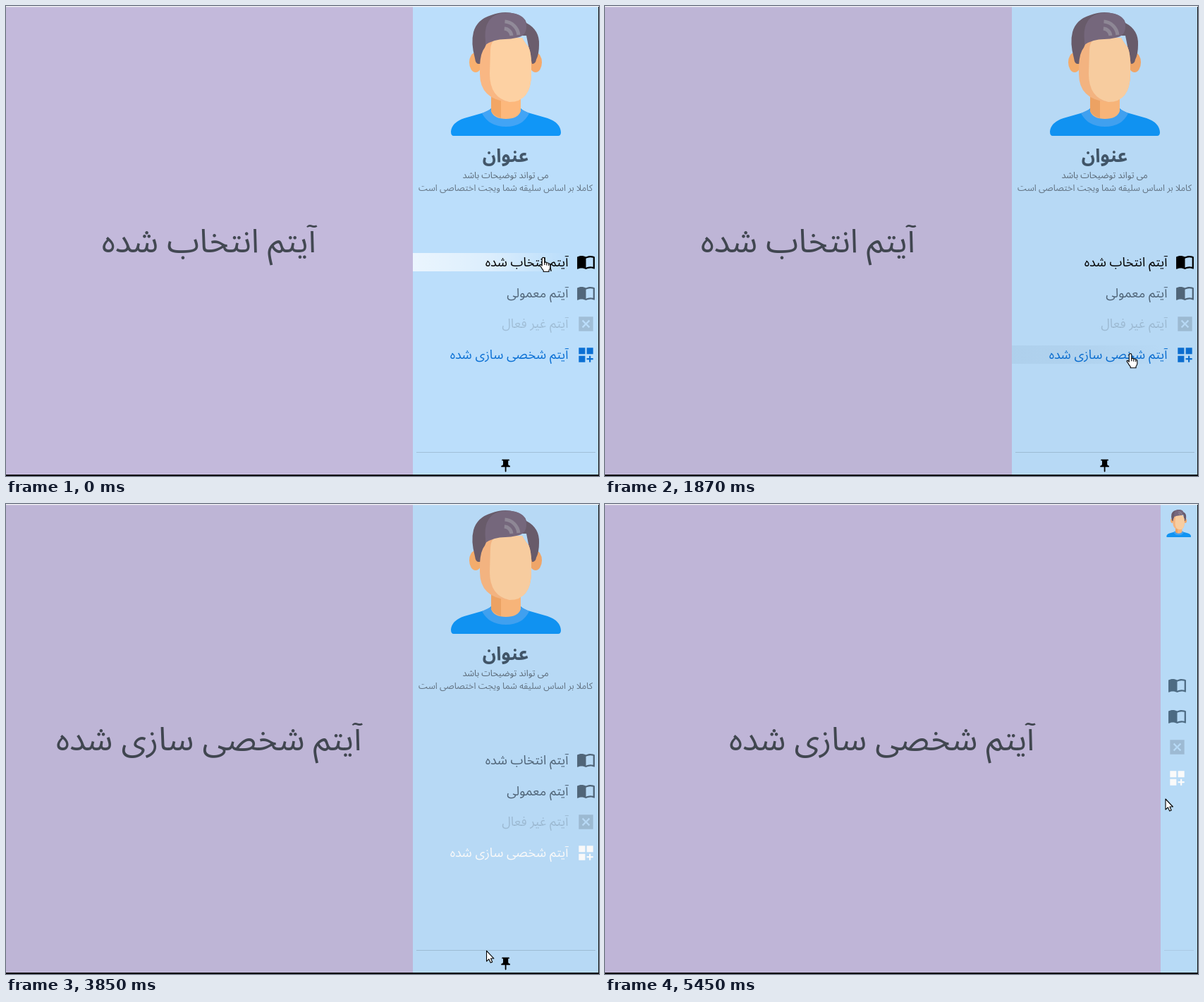
An HTML page with a canvas that plays this animation: 841 by 666 pixels, repeating every 5500 ms.

```html
<!DOCTYPE html>
<html lang="fa">
<head>
<meta charset="utf-8">
<style>
html, body { margin: 0; width: 100%; height: 100%; overflow: hidden; background: #c3b9db; }
canvas { display: block; width: 841px; height: 666px; }
</style>
</head>
<body>
<canvas id="stage" width="841" height="666"></canvas>
<script>
const ctx = document.getElementById('stage').getContext('2d');
const W = 841, H = 666, LOOP = 5500;
const FONT = '"Noto Sans Arabic", "Noto Sans", "DejaVu Sans", sans-serif';
const SELECT_AT = 2600, COLLAPSE_AT = 4040, SLIDE = 520;
const OPEN_W = 264, COMPACT_W = 53;

const ICONS = {
  book: new Path2D('M21 5c-1.11-.35-2.33-.5-3.5-.5-1.95 0-4.05.4-5.5 1.5-1.45-1.1-3.55-1.5-5.5-1.5S2.45 4.9 1 6v14.65c0 .25.25.5.5.5.1 0 .15-.05.25-.05C3.1 20.45 5.05 20 6.5 20c1.95 0 4.05.4 5.5 1.5 1.35-.85 3.8-1.5 5.5-1.5 1.65 0 3.35.3 4.75 1.05.1.05.15.05.25.05.25 0 .5-.25.5-.5V6c-.6-.45-1.25-.75-2-1zm0 13.5c-1.1-.35-2.3-.5-3.5-.5-1.7 0-4.15.65-5.5 1.5V8c1.35-.85 3.8-1.5 5.5-1.5 1.2 0 2.4.15 3.5.5z'),
  off: new Path2D('M3 3v18h18V3zM17 15.6L15.6 17 12 13.4 8.4 17 7 15.6 10.6 12 7 8.4 8.4 7 12 10.6 15.6 7 17 8.4 13.4 12z'),
  tiles: new Path2D('M3 3h8v8H3zM13 3h8v8h-8zM3 13h8v8H3zM18 13h-2v3h-3v2h3v3h2v-3h3v-2h-3z'),
  pin: new Path2D('M16 9V4h1a1 1 0 0 0 0-2H7a1 1 0 0 0 0 2h1v5a3 3 0 0 1-3 3v2h6v7l1 1 1-1v-7h6v-2a3 3 0 0 1-3-3z')
};
const HAND = new Path2D('M-1.8 11V1Q-1.8-.6 0-.6T1.8 1V6.4Q3.6 5.2 4.8 7Q6.8 6.2 7.7 8Q9.6 7.6 9.8 9.6V13.5Q9.5 16 8 17.5V19.5H.2V17.8Q-2 15.6-3.4 12.6Q-5.6 10.4-4.8 9.4Q-3.6 8.6-1.8 11Z');
const ARROW = new Path2D('M0 0V15L3.4 11.9L5.7 17L8.2 15.9L6 11H10.4Z');

const ITEMS = [
  { label: 'آیتم انتخاب شده', icon: 'book', y: 363.5 },
  { label: 'آیتم معمولی', icon: 'book', y: 407.5 },
  { label: 'آیتم غیر فعال', icon: 'off', y: 450.5 },
  { label: 'آیتم شخصی سازی شده', icon: 'tiles', y: 494.5 }
];

// time, x, y of the pointer tip
const TRACK = [
  [0, 762, 357], [640, 755, 399], [1390, 749, 412], [1900, 745, 494], [2370, 745, 496],
  [2680, 745, 495], [2880, 742, 404], [3070, 740, 431], [3500, 708, 645],
  [3760, 708, 645], [4240, 427, 518], [4850, 427, 518], [5450, 795, 418], [5500, 795, 418]
];
const LIGHT = { rgb: '255,255,255', peak: .7 }, DARK = { rgb: '20,50,80', peak: .22 };
// item, fade-in start, fade-out start, tint
const HOVERS = [
  [0, -400, 250, LIGHT], [1, 660, 1560, LIGHT], [3, 1800, 2620, DARK], [1, 2770, 3080, LIGHT]
];

const clamp = v => Math.max(0, Math.min(1, v));
const smooth = v => v * v * (3 - 2 * v);

function rect(x, y, w, h, color) {
  ctx.fillStyle = color;
  ctx.fillRect(x, y, w, h);
}

function text(str, x, y, size, color, align, weight = 400) {
  ctx.font = `${weight} ${size}px ${FONT}`;
  ctx.direction = 'rtl';
  ctx.textAlign = align;
  ctx.fillStyle = color;
  ctx.fillText(str, x, y);
}

function icon(name, x, y, scale, color) {
  ctx.save();
  ctx.translate(x, y);
  ctx.scale(scale, scale);
  ctx.translate(-12, name === 'book' ? -13 : -12);
  ctx.fillStyle = color;
  ctx.fill(ICONS[name], 'evenodd');
  ctx.restore();
}

const shape = (d, color) => { ctx.fillStyle = color; ctx.fill(new Path2D(d)); };

function oval(x, y, rx, ry, color) {
  ctx.beginPath();
  ctx.ellipse(x, y, rx, ry, 0, 0, 7);
  ctx.fillStyle = color;
  ctx.fill();
}

function avatar(x, y, scale) {
  ctx.save();
  ctx.translate(x, y);
  ctx.scale(scale, scale);
  ctx.translate(-631, -9);
  shape('M631 178Q632 165 650 159L678 151Q687 148 690 142H728Q731 148 740 151L768 159Q786 165 787 179Q787 184 783 184H635Q631 184 631 178Z', '#1096f7');
  shape('M675 152L690 145H728L742 152Q733 171 709 171T675 152Z', '#42a4f5');
  shape('M688 122H730V149Q726 160 709 160T688 149Z', '#fdb87c');
  shape('M688 122H702V159Q692 156 688 149Z', '#f2a665');
  oval(666, 80, 9, 14, '#f9b06f');
  oval(751, 80, 9, 14, '#f5a96b');
  shape('M670 82Q666 82 665 74Q659 52 663 37Q668 19 688 13Q706 6 722 11Q736 15 738 24Q757 34 756 55Q756 68 752 76Q751 82 746 82L738 42H685L674 82Z', '#6b5d6d');
  shape('M672 84Q673 66 679 59Q683 48 690 45H732Q737 54 741 58Q745 66 745 84V96Q745 136 712 136Q672 132 672 96Z', '#f9b783');
  shape('M687 62Q688 46 700 45H732Q737 54 741 58Q745 66 745 84V96Q745 136 714 136Q686 130 686 96Z', '#fdd1a3');
  shape('M680 49Q677 22 694 13Q708 7 723 11Q738 15 738 29Q738 43 724 45Q716 47 708 47Q692 47 680 55Z', '#78697f');
  ctx.strokeStyle = '#918a99';
  ctx.lineWidth = 5;
  for (const r of [11, 21]) {
    ctx.beginPath();
    ctx.arc(706, 43, r, -1.5, -.1);
    ctx.stroke();
  }
  ctx.restore();
}

function highlight(t, left) {
  for (const [i, from, to, { rgb, peak }] of HOVERS) {
    const a = clamp((t - from) / 300) * (1 - clamp((t - to) / 250));
    if (!a) continue;
    const g = ctx.createLinearGradient(left, 0, left + 215, 0);
    g.addColorStop(0, `rgba(${rgb},${peak * a})`);
    g.addColorStop(.5, `rgba(${rgb},${peak * .7 * a})`);
    g.addColorStop(1, `rgba(${rgb},0)`);
    rect(left, ITEMS[i].y - 13.5, 215, 26, g);
  }
}

function itemColor(i, chosen) {
  if (i === 2) return 'rgba(0,0,0,.14)';
  if (i === 3) return chosen === 3 ? '#fff' : '#0b70d4';
  return chosen === i ? '#000' : '#52677b';
}

function openPane(t, chosen) {
  const left = W - OPEN_W;
  rect(left, 0, OPEN_W, H, '#bbdefb');
  highlight(t, left);
  avatar(631, 9, 1);
  text('عنوان', 708.5, 221, 26.5, '#43576a', 'center', 600);
  text('می تواند توضیحات باشد', 708.5, 244, 12.6, '#5c6b79', 'center');
  text('کاملا بر اساس سلیقه شما ویجت اختصاصی است', 708.5, 262, 12.6, '#667787', 'center');
  ITEMS.forEach((item, i) => {
    const color = itemColor(i, chosen);
    icon(item.icon, 822.5, item.y, 1.13, color);
    text(item.label, 797.5, item.y + 5.5, 18.1, color, 'right');
  });
  rect(582, 632, 254, 1, 'rgba(0,0,0,.14)');
  icon('pin', 708.6, 651.5, .9, '#000');
}

function compactPane(shift) {
  const left = W - COMPACT_W - shift;
  rect(left, 0, COMPACT_W - 1, H, '#bbdefb');
  avatar(left + 8.3, 8, .223);
  ITEMS.forEach((item, i) =>
    icon(item.icon, left + 23.5, item.y - 106, 1.13, i < 2 ? '#4f6d86' : itemColor(i, 3)));
  rect(left + 5, 632, 42, 1, 'rgba(0,0,0,.07)');
}

function pointer(t) {
  const n = TRACK.findIndex(k => k[0] > t);
  const [t0, x0, y0] = TRACK[n - 1], [t1, x1, y1] = TRACK[n];
  const p = smooth((t - t0) / (t1 - t0));
  ctx.save();
  ctx.translate(x0 + (x1 - x0) * p, y0 + (y1 - y0) * p);
  const outline = t < 3800 ? HAND : ARROW;
  ctx.fillStyle = '#fff';
  ctx.strokeStyle = '#000';
  ctx.lineWidth = 1.1;
  ctx.lineJoin = 'round';
  ctx.fill(outline);
  ctx.stroke(outline);
  if (outline === HAND) ctx.stroke(new Path2D('M1.8 6V10M4.8 7V10.5M7.7 8V11'));
  ctx.restore();
}

function draw(t) {
  const chosen = t < SELECT_AT ? 0 : 3;
  const compact = t >= COLLAPSE_AT;
  const shift = compact ? (OPEN_W - COMPACT_W) * (1 - clamp((t - COLLAPSE_AT) / SLIDE)) ** 2.2 : 0;
  const center = compact ? 392.5 - shift : 287.7;

  rect(0, 0, W, H, '#c3b9db');
  text(ITEMS[chosen].label, center, 348.5, 46.7, '#424852', 'center');
  if (compact) compactPane(shift);
  else openPane(t, chosen);
  const dim = compact ? .02 : .025 * clamp(t / 600);
  rect(0, 0, W, H, `rgba(0,0,0,${dim})`);
  pointer(t);
  rect(0, 0, W, 1.3, '#f4f4f6');
  rect(0, H - 2, W, 2, '#000');
  rect(W - 1, 1, 1, H, '#111');
}

function tick(now) {
  draw(now % LOOP);
  requestAnimationFrame(tick);
}
requestAnimationFrame(tick);
</script>
</body>
</html>
```
